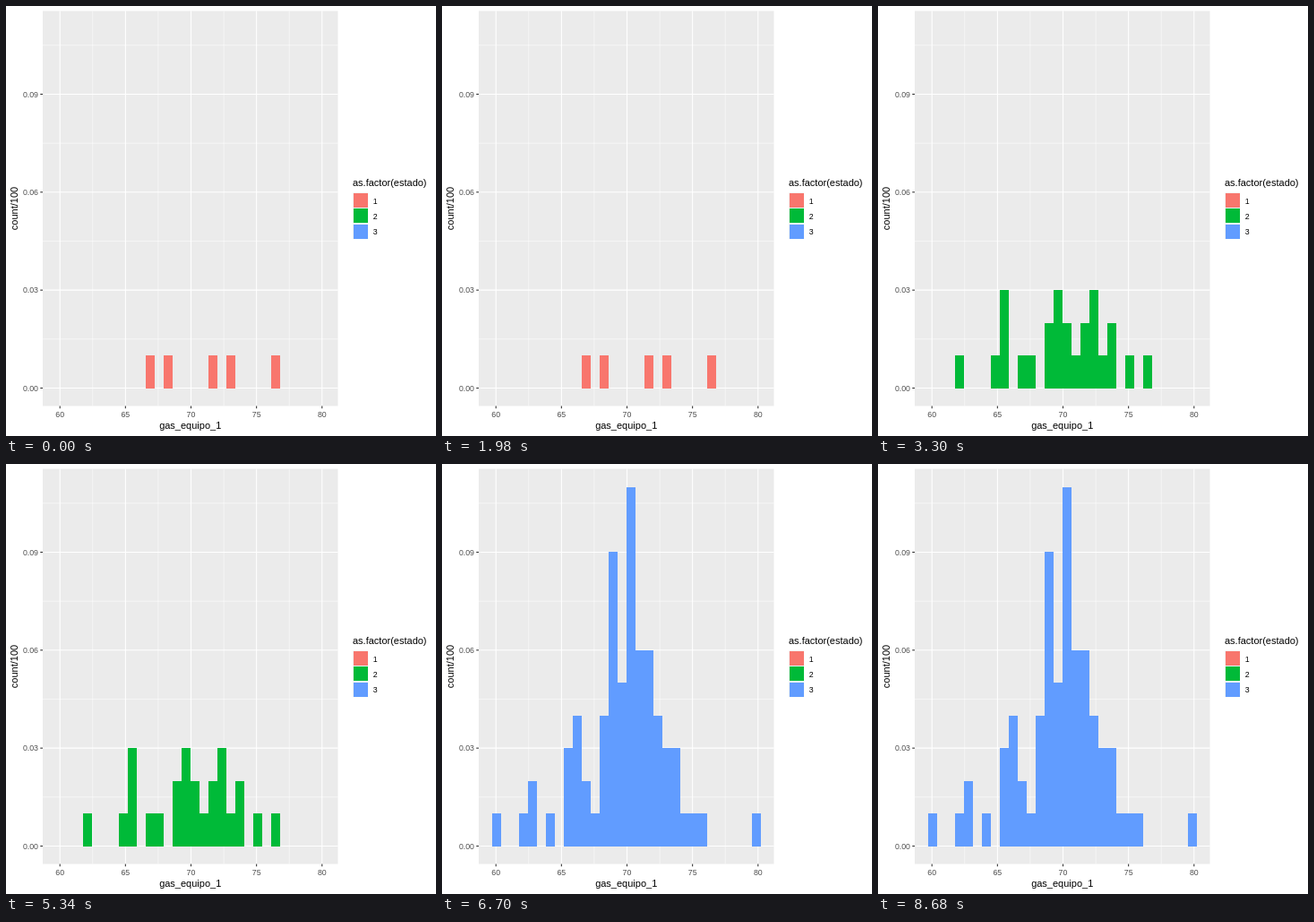
An HTML page that plays this animation: 480 by 480 pixels, repeating every 10000 ms.

```html
<!DOCTYPE html>
<html lang="es">
<head>
<meta charset="utf-8">
<title>Histograma por estado</title>
<style>
  html, body { margin: 0; width: 100%; height: 100%; overflow: hidden; background: #fff; }
  svg { display: block; width: 480px; height: 480px; font: 8.8px "Liberation Sans", Arial, sans-serif; }
  .title { font-size: 11px; }
  .tick { fill: #4d4d4d; }
  .bars, .key { shape-rendering: crispEdges; }
</style>
</head>
<body>
<svg id="plot" viewBox="0 0 480 480"></svg>
<script>
const LOOP = 10000;
const COLORS = ['#F8766D', '#00BA38', '#619CFF'];
const PANEL = { left: 41, right: 370.5, top: 5.5, bottom: 446.5 };
const BASE = 427, UNIT = 36.45, BIN_LEFT = 56, BIN = 10;

// One character per bin, in hundredths (b = 11).
const STATES = [
  { start: 0,    counts: '000000000010100001010000100000' },
  { start: 3300, counts: '000100013011023212312010100000' },
  { start: 6700, counts: '100120103421495b66433111000001' }
];

const plot = document.getElementById('plot');

function add(tag, attrs, parent = plot, text) {
  const el = document.createElementNS('http://www.w3.org/2000/svg', tag);
  for (const key in attrs) el.setAttribute(key, attrs[key]);
  if (text !== undefined) el.textContent = text;
  parent.appendChild(el);
  return el;
}

const rect = (x, y, width, height, fill, parent) =>
  add('rect', { x, y, width, height, fill }, parent);
const line = (x1, y1, x2, y2, stroke, width) =>
  add('line', { x1, y1, x2, y2, stroke, 'stroke-width': width });
const label = (x, y, text, attrs) => add('text', { x, y, ...attrs }, plot, text);

const xPos = v => 60.2 + (v - 60) * 14.63;
const yPos = v => 426.5 - v * 3645;

function drawGrid() {
  const { left, right, top, bottom } = PANEL;
  rect(left, top, right - left, bottom - top, '#EBEBEB');
  const vertical = (v, w) => line(xPos(v), top, xPos(v), bottom, '#fff', w);
  const horizontal = (v, w) => line(left, yPos(v), right, yPos(v), '#fff', w);
  for (let i = 0; i < 4; i++) {
    horizontal(0.015 + i * 0.03, 0.53);
    vertical(62.5 + i * 5, 0.53);
  }
  for (let i = 0; i < 4; i++) horizontal(i * 0.03, 1.07);
  for (let i = 0; i < 5; i++) vertical(60 + i * 5, 1.07);
}

function drawBars({ counts }, i) {
  const group = add('g', { class: 'bars', fill: COLORS[i] });
  [...counts].forEach((c, k) => {
    const n = parseInt(c, 16);
    if (!n) return;
    const top = Math.floor(BASE - n * UNIT);
    rect(BIN_LEFT + k * BIN, top, BIN, BASE - top, COLORS[i], group);
  });
  return group;
}

function drawAxes() {
  const { left, bottom } = PANEL;
  for (let i = 0; i < 4; i++) {
    const v = i * 0.03, y = yPos(v);
    line(left - 2.74, y, left, y, '#333', 1.07);
    label(36, y + 3.2, v.toFixed(2), { class: 'tick', 'text-anchor': 'end' });
  }
  for (let i = 0; i < 5; i++) {
    const v = 60 + i * 5, x = xPos(v);
    line(x, bottom, x, bottom + 2.74, '#333', 1.07);
    label(x, 459, v, { class: 'tick', 'text-anchor': 'middle' });
  }
  const title = { class: 'title', 'text-anchor': 'middle' };
  label(205.7, 472, 'gas_equipo_1', title);
  label(0, 0, 'count/100', { ...title, transform: 'translate(13 226) rotate(-90)' });
}

function drawLegend() {
  label(387, 201, 'as.factor(estado)', { class: 'title' });
  COLORS.forEach((color, i) => {
    const y = 208.4 + i * 17.28;
    rect(387, y, 17.28, 17.28, '#F2F2F2');
    rect(388, Math.round(y + 0.7), 16, 16, color).setAttribute('class', 'key');
    label(409.8, y + 12.4, i + 1);
  });
}

drawGrid();
const groups = STATES.map(drawBars);
drawAxes();
drawLegend();

function render(now) {
  const t = now % LOOP;
  const current = STATES.filter(s => t >= s.start).length - 1;
  groups.forEach((g, i) => g.setAttribute('visibility', i === current ? 'visible' : 'hidden'));
}

const begin = performance.now();
function loop() {
  render(performance.now() - begin);
  requestAnimationFrame(loop);
}
loop();
</script>
</body>
</html>
```
